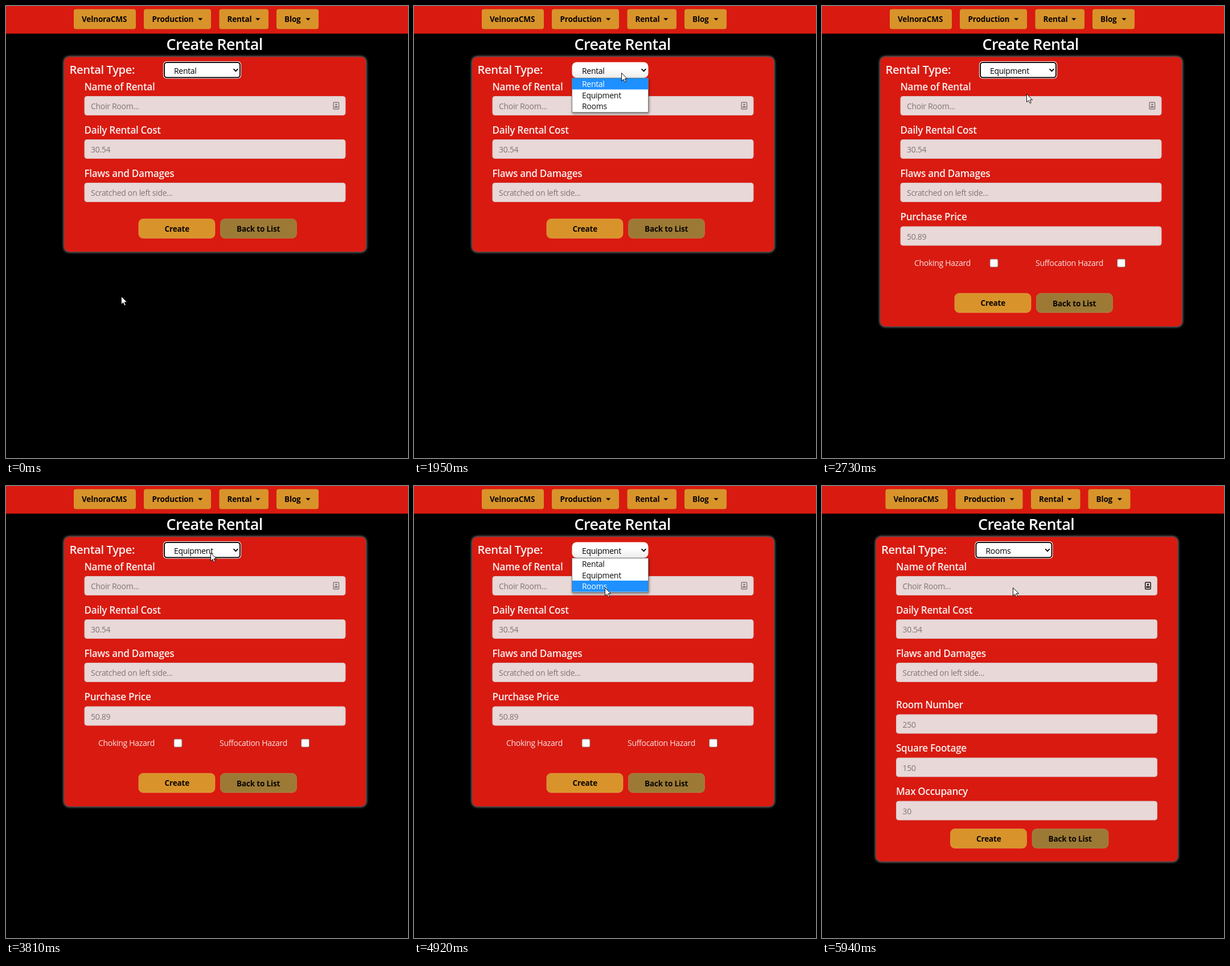
Write an HTML page that moves like this. It is 706x793 px and loops after 6 s.

```html
<!DOCTYPE html>
<html lang="en">
<head>
<meta charset="utf-8">
<title>Create Rental</title>
<style>
  html, body { margin: 0; width: 100%; height: 100%; overflow: hidden; background: #000; }
  svg { display: block; width: 706px; height: 793px; }
  text { font-family: "Open Sans", "Noto Sans", sans-serif; white-space: pre; }
  .title { font-size: 27px; font-weight: 600; letter-spacing: -.55px; fill: #fff; }
  .type { font-size: 20.3px; font-weight: 600; letter-spacing: -.45px; fill: #fbefee; }
  .label { font-size: 17.2px; font-weight: 600; letter-spacing: -.35px; fill: #fbefee; }
  .body { font-size: 14px; letter-spacing: -.3px; }
  .btn { font-size: 13.6px; font-weight: 700; letter-spacing: -.2px; fill: #0a0500; }
  .hint { fill: #807576; }
  .light { fill: #f8e4e2; }
  .card { filter: drop-shadow(0 0 2px #8a8a8a); }
  .list { filter: drop-shadow(1px 2px 2px rgba(0, 0, 0, .45)); }
</style>
</head>
<body>
<svg id="stage" viewBox="0 0 706 793">
  <defs>
    <linearGradient id="sheen" x2="0" y2="1">
      <stop offset=".4" stop-color="#fff"/>
      <stop offset="1" stop-color="#ececec"/>
    </linearGradient>
  </defs>
</svg>
<script>
const LOOP = 6000;
const RED = '#d91a10', AMBER = '#d8942a';
const OPTIONS = ['Rental', 'Equipment', 'Rooms'];
const ROW = 19.6, LIST_TOP = 126.8;

// Per rental type: card height and top of the button row
const LAYOUT = [
  { card: 342.5, buttons: 373 },
  { card: 473.5, buttons: 503.5 },
  { card: 570, buttons: 601 }
];

// time, selected option, list open
const STATES = [
  [0, 0, false], [1560, 0, true],
  [2610, 1, false], [4050, 1, true],
  [5160, 2, false]
];

// time, x, y of the pointer tip
const PATH = [
  [0, 202, 509], [90, 202, 509], [240, 220, 486], [450, 307, 385],
  [630, 364, 136], [690, 366, 114], [1290, 366, 114], [1500, 364, 117],
  [2010, 364, 117], [2370, 359, 154], [3210, 359, 154], [3510, 359, 117],
  [4440, 359, 117], [4800, 335, 178], [LOOP, 335, 178]
];

const stage = document.getElementById('stage');

function add(parent, tag, attrs = {}) {
  const el = document.createElementNS('http://www.w3.org/2000/svg', tag);
  for (const k in attrs) el.setAttribute(k, attrs[k]);
  parent.append(el);
  return el;
}
const group = (parent, attrs) => add(parent, 'g', attrs);
const rect = (parent, x, y, width, height, rx, fill, more) =>
  add(parent, 'rect', { x, y, width, height, rx, fill, ...more });
function text(parent, x, y, str, cls) {
  const el = add(parent, 'text', { x, y, class: cls });
  el.textContent = str;
  return el;
}
const show = (el, on) => el.setAttribute('visibility', on ? 'inherit' : 'hidden');

function field(parent, y, label, hint) {
  text(parent, 137.5, y - 10.5, label, 'label');
  rect(parent, 138, y + .5, 458, 33, 4, '#e8d8d8', { stroke: '#d9bfc0' });
  text(parent, 149, y + 23, hint, 'body hint');
}

function navButton(x, width, textX, label, caretX) {
  rect(page, x, 5.5, width, 35, 4, AMBER);
  text(page, textX, 28, label, 'btn');
  if (caretX) add(page, 'path', { d: `M${caretX} 21.3h8.4l-4.2 4.2z`, fill: '#0a0500' });
}

function button(parent, x, fill, edge, label, textX, textY) {
  rect(parent, x, .5, 134, 34, 8, fill, { stroke: edge, 'stroke-dasharray': '1 1' });
  text(parent, textX, textY, label, 'btn');
}

function checkbox(parent, x, label, boxX) {
  text(parent, x, 455.5, label, 'body light');
  rect(parent, boxX, 444, 14, 14, 2, '#fff', { stroke: '#8a6a6a' });
}

// Page
rect(stage, 0, 0, 706, 48.5, 0, RED);
const page = group(stage);
navButton(119, 109, 133, 'VelnoraCMS');
navButton(242, 118, 256.5, 'Production', 337);
navButton(374.5, 86.5, 388.5, 'Rental', 438);
navButton(475, 74, 489, 'Blog', 526.3);
text(page, 281.5, 76.5, 'Create Rental', 'title');

const card = rect(page, 102, 89, 530.5, 342, 9, RED,
  { stroke: '#5c4a48', 'stroke-width': 1.2, class: 'card' });
text(page, 111.5, 119, 'Rental Type:', 'type');
field(page, 158, 'Name of Rental', 'Choir Room...');
field(page, 234, 'Daily Rental Cost', '30.54');
field(page, 310, 'Flaws and Damages', 'Scratched on left side...');

// Contact icon inside the first field
const icon = group(page, { fill: 'none', 'stroke-width': 1.5 });
rect(icon, 575.2, 169, 9.4, 12, 1.2, 'none');
add(icon, 'circle', { cx: 579.9, cy: 173, r: 1 });
add(icon, 'path', { d: 'M577.6 177.8v-1.2h4.6v1.2z' });

const extras = OPTIONS.map(() => group(page));
field(extras[1], 386.5, 'Purchase Price', '50.89');
checkbox(extras[1], 162, 'Choking Hazard', 295);
checkbox(extras[1], 375, 'Suffocation Hazard', 518.5);
field(extras[2], 400.5, 'Room Number', '250');
field(extras[2], 476.5, 'Square Footage', '150');
field(extras[2], 552.5, 'Max Occupancy', '30');

const buttons = group(page);
button(buttons, 233, AMBER, '#e9b765', 'Create', 278.5, 22.5);
button(buttons, 376.5, '#9c7a35', '#b79a5c', 'Back to List', 405, 23.2);

// Select box
const ring = group(page);
rect(ring, 276, 97, 137, 30.5, 6, '#fff');
rect(ring, 278, 99, 133, 26.5, 4.5, '#fff', { stroke: '#0a0a0a', 'stroke-width': 2 });
const plain = rect(page, 277.5, 98.5, 134, 27.5, 8, 'url(#sheen)');
const chosen = text(page, 295, 118.5, '', 'body');
add(page, 'path', {
  d: 'M399.6 110.4l3.9 3.9 3.9-3.9', fill: 'none', stroke: '#111', 'stroke-width': 2
});

const list = group(page);
rect(list, 277.5, 126.5, 134, 60, 0, '#fff', { stroke: '#777', class: 'list' });
const mark = rect(list, 278, 0, 133, ROW, 0, '#1e90ff');
const items = OPTIONS.map((name, i) =>
  text(list, 295, LIST_TOP + i * ROW + 15.2, name, 'body'));

const pointer = add(stage, 'path', {
  d: 'M.5 .5v14.2l3.3-3.1 2.3 5 2.3-1-2.3-4.9h4.5z',
  fill: '#fff', stroke: '#111', 'stroke-width': 1, 'stroke-linejoin': 'round'
});

function pointerAt(t) {
  const i = PATH.findIndex(p => p[0] > t);
  const [t0, x0, y0] = PATH[i - 1], [t1, x1, y1] = PATH[i];
  const k = (t - t0) / (t1 - t0);
  return [x0 + (x1 - x0) * k, y0 + (y1 - y0) * k];
}

function render(t) {
  const [, kind, open] = STATES.findLast(s => s[0] <= t);
  const [x, y] = pointerAt(t);
  const rooms = kind === 2;

  page.setAttribute('transform', `translate(${rooms ? -7.5 : 0} 0)`);
  card.setAttribute('height', LAYOUT[kind].card);
  buttons.setAttribute('transform', `translate(0 ${LAYOUT[kind].buttons})`);
  extras.forEach((g, i) => show(g, i === kind));
  icon.setAttribute('stroke', rooms ? '#1c1414' : '#857a7a');

  chosen.textContent = OPTIONS[kind];
  show(ring, !open);
  show(plain, open);
  show(list, open);
  const hover = Math.floor((y - LIST_TOP) / ROW);
  const active = hover < 0 ? kind : Math.min(hover, 2);
  mark.setAttribute('y', LIST_TOP + active * ROW);
  items.forEach((el, i) => el.setAttribute('fill', i === active ? '#fff' : '#111'));

  pointer.setAttribute('transform', `translate(${x} ${y})`);
}

const start = performance.now();
function tick() {
  render((performance.now() - start) % LOOP);
  requestAnimationFrame(tick);
}
tick();
</script>
</body>
</html>
```
